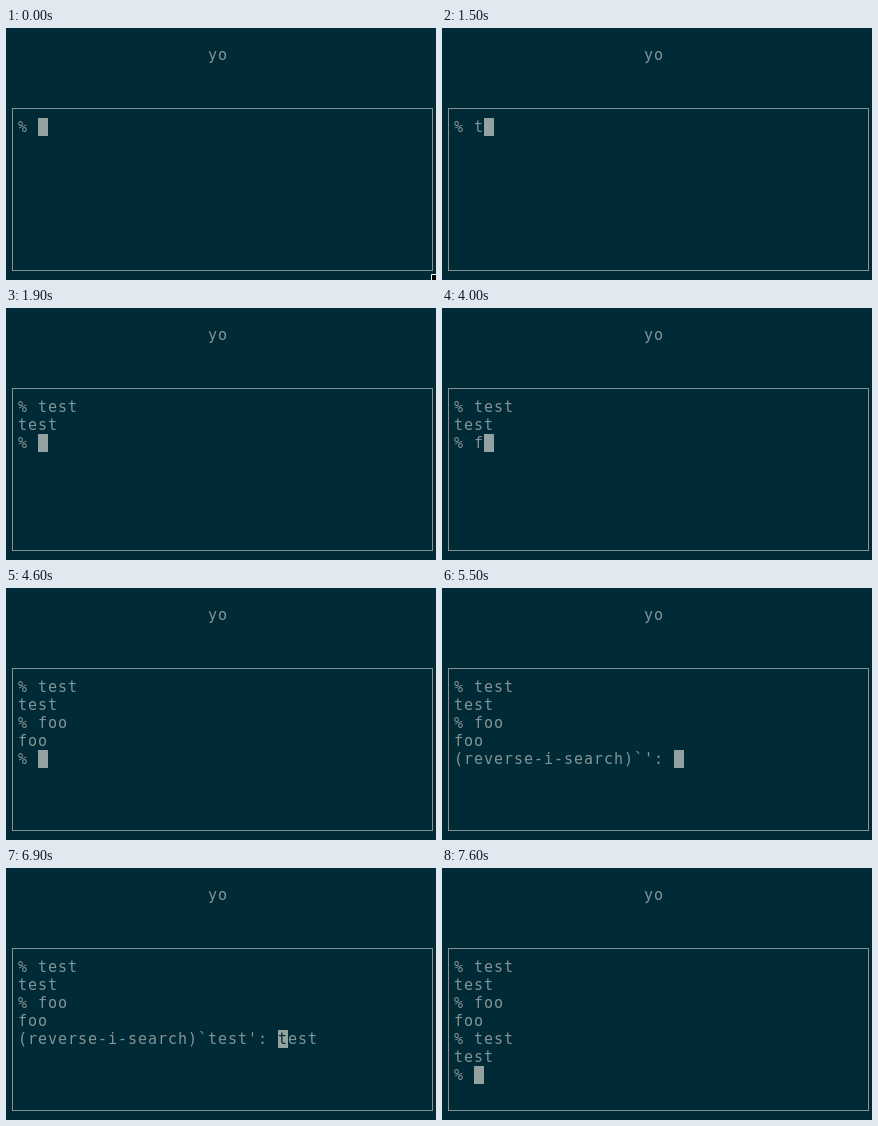
An HTML page with a canvas that plays this animation: 430 px wide and 252 px high, repeating every 8000 ms.

```html
<!DOCTYPE html>
<html lang="en">
<head>
<meta charset="utf-8">
<title>Terminal session</title>
<style>
  html, body { margin: 0; width: 430px; height: 252px; overflow: hidden; background: #002b36; }
  canvas { display: block; }
</style>
</head>
<body>
<canvas id="stage" width="430" height="252"></canvas>
<script>
const ctx = document.getElementById("stage").getContext("2d");
const LOOP = 8000, CELL_W = 10, CELL_H = 18, LEFT = 12, TOP = 90;
const BG = "#002b36", FG = "#839496", CURSOR = "#93a1a1";

const typed = (word, times, t) => word.slice(0, times.filter(at => t >= at).length);

// Visible lines plus the column of the cursor on the last one.
function screen(t) {
  const at = (lines, col = lines[lines.length - 1].length) => ({ lines, col });
  const first = ["% test", "test"];
  const second = [...first, "% foo", "foo"];
  if (t < 1900) return at(["% " + typed("test", [1500, 1600, 1700, 1800], t)]);
  if (t < 4600) return at([...first, "% " + typed("foo", [4000, 4200, 4400], t)]);
  if (t < 5500) return at([...second, "% "]);
  if (t < 7600) {
    const query = typed("test", [6100, 6600, 6800, 6900], t);
    const prompt = "(reverse-i-search)`" + query + "': ";
    return at([...second, prompt + (query ? "test" : "")], prompt.length);
  }
  return at([...second, "% test", "test", "% "]);
}

function text(str, col, row, color = FG) {
  ctx.fillStyle = color;
  [...str].forEach((ch, i) =>
    ctx.fillText(ch, LEFT + (col + i) * CELL_W, TOP + row * CELL_H + 14));
}

function pointer() {
  ctx.beginPath();
  ctx.moveTo(425.5, 246.5);
  ctx.lineTo(435, 246.5);
  ctx.lineTo(431.5, 249.5);
  ctx.lineTo(437, 255);
  ctx.lineTo(434, 258);
  ctx.lineTo(428.5, 252.5);
  ctx.lineTo(425.5, 256);
  ctx.closePath();
  ctx.fillStyle = "#000";
  ctx.fill();
  ctx.strokeStyle = "#fff";
  ctx.stroke();
}

function draw(t) {
  ctx.fillStyle = BG;
  ctx.fillRect(0, 0, 430, 252);
  ctx.font = '15px "DejaVu Sans Mono", monospace';
  ctx.lineWidth = 1;
  ctx.strokeStyle = FG;
  ctx.strokeRect(6.5, 80.5, 420, 162);
  text("yo", 19, -4);

  const { lines, col } = screen(t);
  const row = lines.length - 1;
  lines.forEach((line, i) => text(line, 0, i));
  ctx.fillStyle = CURSOR;
  ctx.fillRect(LEFT + col * CELL_W, TOP + row * CELL_H, CELL_W, CELL_H);
  text(lines[row][col] || "", col, row, BG);

  if (t < 100) pointer();
}

const start = performance.now();
function frame() {
  draw((performance.now() - start) % LOOP);
  requestAnimationFrame(frame);
}
frame();
</script>
</body>
</html>
```
